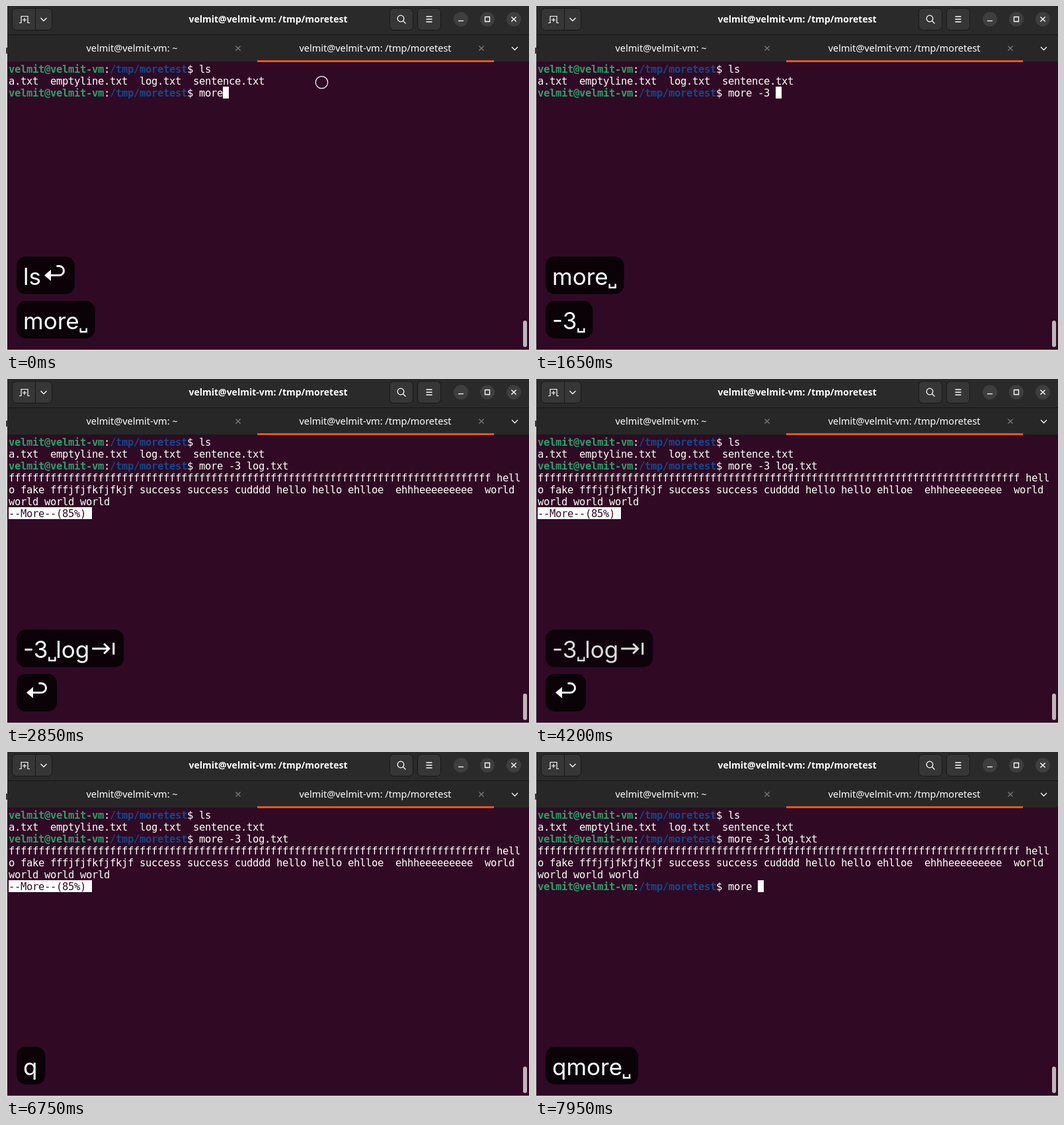
Recreate the animation shown at these times as an HTML page with a canvas. Size 791 px wide and 522 px high, loop 8000 ms.

```html
<!DOCTYPE html>
<html lang="en">
<head>
<meta charset="utf-8">
<title>Terminal session</title>
<style>
  html, body { margin: 0; width: 100%; height: 100%; overflow: hidden; background: #300a24; }
  canvas { display: block; }
</style>
</head>
<body>
<canvas id="stage" width="791" height="522"></canvas>
<script>
const ctx = document.getElementById("stage").getContext("2d");
const LOOP = 8000;
const WHITE = "#ffffff", PURPLE = "#300a24", GREEN = "#26a269", BLUE = "#12488b", ORANGE = "#e95420";
const BUTTON = "#363636", BORDER = "#181818";
const CELL_W = 9, CELL_H = 18, LEFT = 4, TOP = 86, BASELINE = 15;
const USER = "velmit@velmit-vm", PATH = "/tmp/moretest";

// Each track lists [start time, value...]; the last entry already reached applies.
const firstCommand = [
  [0, "more"], [150, "more "], [900, "more -"], [1200, "more -3"], [1650, "more -3 "],
  [1950, "more -3 l"], [2100, "more -3 log"], [2250, "more -3 log.txt "]
];
const secondCommand = [
  [6900, ""], [7200, "m"], [7350, "mo"], [7500, "more"], [7950, "more "]
];
// [start time, opacity of the oldest key label, labels from newest to oldest]
const keyLabels = [
  [0, 1, "more␣", "ls↵"],
  [900, 0.06, "-", "more␣", "ls↵"],
  [1050, 1, "-", "more␣"],
  [1200, 1, "-3", "more␣"],
  [1650, 1, "-3␣", "more␣"],
  [1800, 1, "-3␣l", "more␣"],
  [1950, 1, "-3␣log", "more␣"],
  [2100, 0.06, "-3␣log", "more␣"],
  [2250, 1, "-3␣log⇥"],
  [2850, 1, "↵", "-3␣log⇥"],
  [4200, 0.86, "↵", "-3␣log⇥"],
  [4350, 1, "↵"],
  [4800, 0.5, "↵"],
  [4950, 0.06, "↵"],
  [5100, 1],
  [6750, 1, "q"],
  [7200, 1, "qm"],
  [7350, 1, "qmor"],
  [7500, 1, "qmore"],
  [7800, 1, "qmore␣"]
];
const output = [
  "f".repeat(81) + " hell",
  "o fake fffjfjfkfjfkjf success success cudddd hello hello ehlloe  ehhheeeeeeeee  world",
  "world world world"
];

const at = (track, time) => track.findLast(entry => entry[0] <= time);

function rect(x, y, w, h, color) {
  ctx.fillStyle = color;
  ctx.fillRect(x, y, w, h);
}

function panel(x, y, w, h, radius, fill, border) {
  ctx.beginPath();
  ctx.roundRect(x, y, w, h, radius);
  ctx.fillStyle = fill;
  ctx.fill();
  if (border) stroke(null, border, 1);
}

function stroke(path, color = WHITE, width = 1.3) {
  ctx.strokeStyle = color;
  ctx.lineWidth = width;
  path ? ctx.stroke(new Path2D(path)) : ctx.stroke();
}

function ring(x, y, radius, width) {
  ctx.beginPath();
  ctx.arc(x, y, radius, 0, 2 * Math.PI);
  stroke(null, WHITE, width);
}

function label(text, x, y, font) {
  ctx.font = font;
  ctx.textAlign = "center";
  ctx.fillStyle = WHITE;
  ctx.fillText(text, x, y);
}

function cross(x, y, size, color) {
  stroke(`M${x - size} ${y - size}l${2 * size} ${2 * size}m0 ${-2 * size}l${-2 * size} ${2 * size}`, color, 1.4);
}

const chevron = (x, y) => stroke(`M${x - 4.5} ${y - 2}l4.5 4.5 4.5 -4.5`);

function drawWindow() {
  rect(0, 0, 791, 522, "#d2d0d1");
  rect(0, 63, 2, 9, "#3a3a3a");
  rect(2, 0, 789, 520, PURPLE);
  rect(2, 0, 789, 43, "#2a2a2a");
  rect(2, 43, 789, 1, "#151515");
  rect(2, 44, 789, 40, "#272727");
  rect(2, 84, 789, 1, BORDER);
  rect(380, 82, 358, 3, ORANGE);

  panel(9.5, 3.5, 60, 33, 6, BUTTON, BORDER);
  rect(44, 4, 1, 32, BORDER);
  stroke("M20 25.5h3v-10h10v10h3M28 18v6M25 21h6", WHITE, 1.2);
  chevron(57, 20);
  for (const x of [580.5, 622.5]) panel(x, 3.5, 35, 33, 6, BUTTON, BORDER);
  ring(597, 19, 4.8, 1.3);
  stroke("M600.5 22.5l4 4");
  stroke("M635.5 16h9m-9 4h9m-9 4h9");

  for (const x of [688, 728, 768]) panel(x - 11, 9, 22, 22, 11, "#3e3e3e");
  stroke("M684 22.5h8");
  stroke("M724.5 16.5h7v7h-7z");
  cross(768, 20, 3.6, WHITE);

  label(`${USER}: ${PATH}`, 396.5, 25, 'bold 14px "Noto Sans", sans-serif');
  const tabFont = '14.5px "Noto Sans", sans-serif';
  label(`${USER}: ~`, 190.5, 69, tabFont);
  label(`${USER}: ${PATH}`, 558.5, 69, tabFont);
  cross(351, 64, 3.6, "#777777");
  cross(719, 64, 3.6, "#777777");
  chevron(769.5, 64);
  panel(782, 476, 6, 40, 3, "#c0b5bd");
}

function print(row, column, text, color = WHITE, weight = "") {
  ctx.font = `${weight} 15.5px "DejaVu Sans Mono", monospace`;
  ctx.textAlign = "left";
  ctx.fillStyle = color;
  [...text].forEach((char, i) =>
    ctx.fillText(char, LEFT + (column + i) * CELL_W, TOP + row * CELL_H + BASELINE));
}

function highlight(row, column, count) {
  rect(LEFT + column * CELL_W, TOP + row * CELL_H, count * CELL_W, CELL_H, WHITE);
}

function prompt(row, command, active) {
  print(row, 0, USER, GREEN, "bold");
  print(row, 16, ":");
  print(row, 17, PATH, BLUE, "bold");
  print(row, 30, "$ " + command);
  if (active) highlight(row, 32 + command.length, 1);
}

function drawTerminal(time) {
  const entered = time >= 2850;
  prompt(0, "ls", false);
  print(1, 0, "a.txt  emptyline.txt  log.txt  sentence.txt");
  prompt(2, at(firstCommand, time)[1], !entered);
  if (!entered) return;
  output.forEach((line, i) => print(3 + i, 0, line));
  const next = at(secondCommand, time);
  if (next) {
    prompt(6, next[1], true);
  } else {
    highlight(6, 0, 14);
    print(6, 0, "--More--(85%)", PURPLE);
  }
}

// Special keys: advance width and drawing, relative to the pen and the label top.
const symbols = {
  "␣": { width: 12, draw: () => stroke("M2 41.5v5.5h9v-5.5", WHITE, 2.4) },
  "↵": {
    width: 39,
    draw() {
      stroke("M12 28.5h15.5a7 7 0 0 0 0 -14h-4", WHITE, 3);
      ctx.fill(new Path2D("M5 28.5l10 -8.5v17z"));
    }
  },
  "⇥": { width: 40, draw: () => stroke("M4 29h25M22 21.5l7.5 7.5 -7.5 7.5M36.5 20v18", WHITE, 3) }
};

function drawKey(text, y, opacity) {
  ctx.font = "35px Inter, sans-serif";
  ctx.textAlign = "left";
  const runs = text.match(/[␣↵⇥]|[^␣↵⇥]+/g);
  const widths = runs.map(run => symbols[run]?.width ?? ctx.measureText(run).width);
  const total = widths.reduce((sum, width) => sum + width, 22);
  ctx.save();
  ctx.globalAlpha = opacity;
  panel(16, y, total, 57, 14, "rgba(0, 0, 0, 0.8)");
  ctx.fillStyle = WHITE;
  ctx.translate(26, y);
  runs.forEach((run, i) => {
    if (symbols[run]) symbols[run].draw();
    else ctx.fillText(run, 0, 43);
    ctx.translate(widths[i], 0);
  });
  ctx.restore();
}

function drawKeys(time) {
  const [, oldestOpacity, ...labels] = at(keyLabels, time);
  labels.forEach((text, i) =>
    drawKey(text, 446 - 67 * i, i === labels.length - 1 ? oldestOpacity : 1));
}

function frame() {
  const time = performance.now() % LOOP;
  drawWindow();
  drawTerminal(time);
  drawKeys(time);
  if (time < 150) ring(477.5, 115.5, 9.2, 1.2);
  requestAnimationFrame(frame);
}
frame();
</script>
</body>
</html>
```
